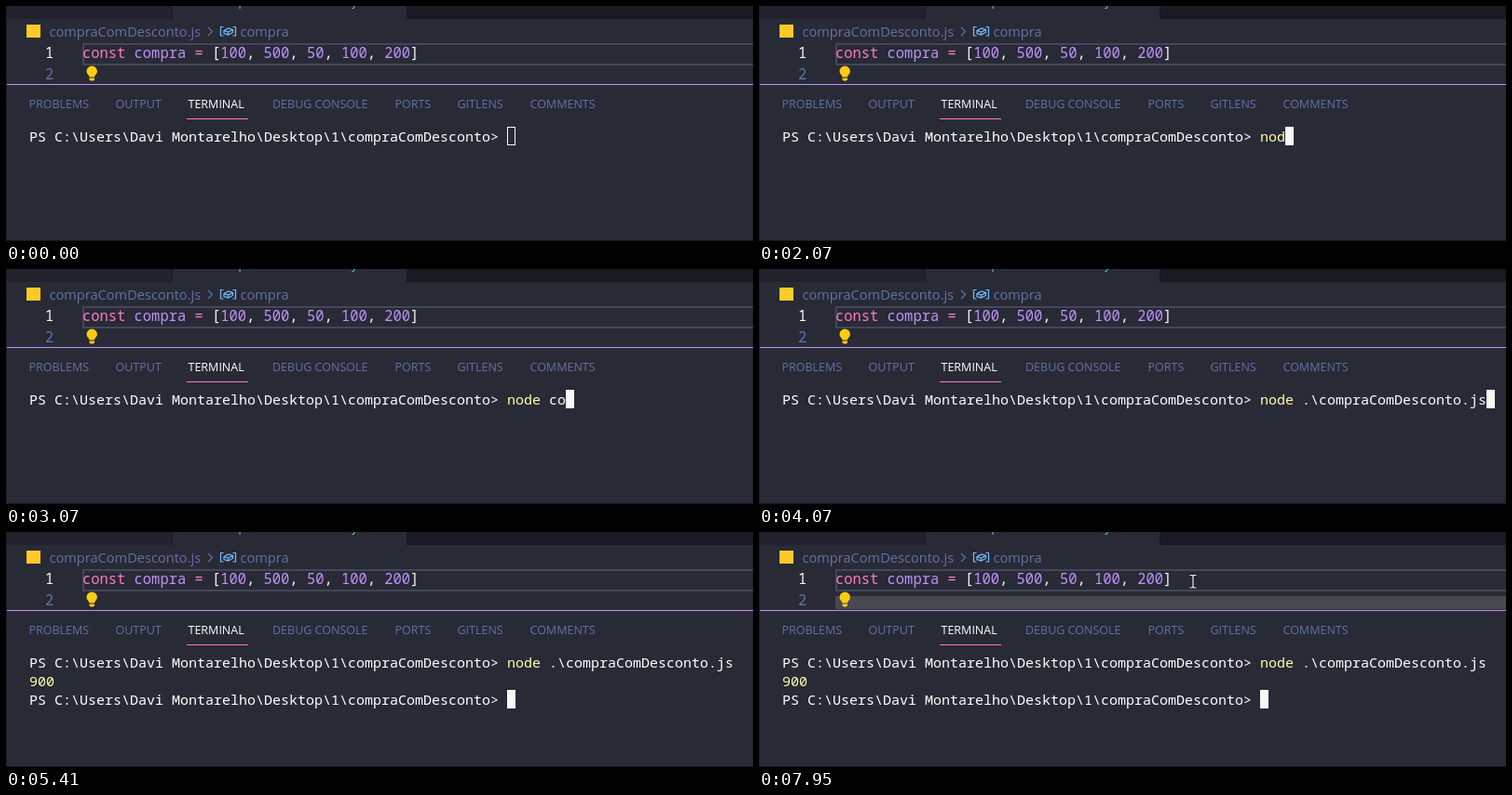
An HTML page for the animation above (8 s loop, 802 by 253 pixels).

```html
<!DOCTYPE html>
<html lang="pt">
<head>
<meta charset="utf-8">
<title>Terminal</title>
<style>
  html, body { margin: 0; width: 100%; height: 100%; overflow: hidden; background: #282a36; }
  svg { display: block; }
  text { white-space: pre; fill: #f8f8f2; }
  .ui { font-family: "Open Sans", "Noto Sans", sans-serif; font-size: 14.6px; }
  .tabs { font-family: "Open Sans", "Noto Sans", sans-serif; font-size: 12.5px; }
  .code, .term { font-family: "Noto Sans Mono", "DejaVu Sans Mono", monospace; font-weight: 500; }
  .code { font-size: 15.45px; }
  .term { font-size: 15px; }
  .term text { fill: #fff; }
  .active { fill: #fff; font-weight: 500; }
  .dim { fill: #6272a4; }
  .pink { fill: #ff79c6; }
  .purple { fill: #bd93f9; }
  .term .yellow { fill: #ffffa5; }
</style>
</head>
<body>
<svg width="802" height="253" viewBox="0 0 802 253">
  <!-- editor tabs -->
  <rect width="802" height="14" fill="#191a21"/>
  <rect width="178" height="14" fill="#21222c"/>
  <rect x="179" width="251" height="14" fill="#282a36"/>
  <text class="ui" x="220" y="-1" style="fill:#4fc59a">compraComDesconto.js</text>

  <!-- breadcrumb -->
  <rect x="22" y="20" width="15" height="14" fill="#ffca28"/>
  <text class="ui dim" x="46.5" y="32.5">compraComDesconto.js</text>
  <path d="M217 23l4.500 4.500-4.500 4.500" fill="none" stroke="#6272a4" stroke-width="1.200"/>
  <g fill="none" stroke="#75beff" stroke-width="1.200">
    <path d="M233.500 22.500h-3v9.500h3M243.500 22.500h3v9.500h-3"/>
    <path d="M234 26.500l5-2.500 4.500 1.500v3l-5 2.500-4.500-1.500zl4.500 1.500 5-2.500M238.500 28v3"/>
  </g>
  <text class="ui dim" x="251.500" y="32.500">compra</text>

  <!-- editor -->
  <path d="M802 41H83V63H802" fill="none" stroke="#44475a" stroke-width="2"/>
  <text class="code" x="42" y="56">1</text>
  <text class="code dim" x="42" y="78.500">2</text>
  <text class="code" id="source" x="82" y="56"></text>
  <rect id="scrollbar" x="82" y="69" width="720" height="14" fill="#797979" fill-opacity=".4"/>
  <path d="M89.500 76.500C89.500 74.500 86.500 73.500 86.500 70.300A5.700 5.700 0 0 1 97.900 70.300C97.900 73.500 95 74.500 95 76.500ZM89.500 77.500H95V79.500L93.500 80.500H91L89.500 79.500Z" fill="#ffcc12"/>

  <!-- panel -->
  <rect y="84" width="802" height="1" fill="#bd93f9"/>
  <g id="panelTabs"></g>
  <rect x="194" y="121" width="66" height="1" fill="#ff79c6"/>
  <g class="term">
    <text id="line1" x="25" y="146"></text>
    <text id="line2" class="yellow" x="25" y="166"></text>
    <text id="line3" x="25" y="186"></text>
  </g>
  <rect id="caret" width="8" height="19" stroke="#f8f8f2"/>
  <rect width="1" height="253" fill="#1e1f28"/>
  <rect y="252" width="802" height="1" fill="#191a21"/>

  <g id="mouse" fill="none">
    <path d="M-3.500-6.500H-1L0-5.500 1-6.500H3.500M0-5.500V6M-3.500 7H-1L0 6 1 7H3.500" stroke="#15161c" stroke-width="2.600"/>
    <path d="M-3.500-6.500H-1L0-5.500 1-6.500H3.500M0-5.500V6M-3.500 7H-1L0 6 1 7H3.500" stroke="#f4f4f4" stroke-width="1.200"/>
  </g>
</svg>
<script>
const $ = id => document.getElementById(id);
const clamp = v => Math.min(1, Math.max(0, v));
const LOOP = 8000, CHAR = 9, LEFT = 25, TOP = 130, ROW = 20, TICK = 70;
const PROMPT = String.raw`PS C:\Users\Davi Montarelho\Desktop\1\compraComDesconto> `;
const PROMPT_HTML = PROMPT.replace('>', '&gt;');

// Text present in the command line from each time on.
const typing = [
  [0, ''], [1600, 'n'], [1820, 'no'], [2010, 'nod'], [2210, 'node'], [2470, 'node '],
  [2940, 'node c'], [3070, 'node co'], [4000, String.raw`node .\compraComDesconto.js`]
];
const FOCUS = 940, ENTER = 5210, OUTPUT = 5340, DONE = 5410;
const MOVE = 7060, NUDGE = 7670, HOVER = 7200;

const span = (cls, text) => `<tspan class="${cls}">${text}</tspan>`;

$('source').innerHTML = span('pink', 'const') + span('purple', ' compra ') + span('pink', '= ') +
  '[100, 500, 50, 100, 200]'.replace(/\d+/g, n => span('purple', n));

$('panelTabs').innerHTML = [
  ['PROBLEMS', 24.5], ['OUTPUT', 117.5], ['TERMINAL', 195.5], ['DEBUG CONSOLE', 286],
  ['PORTS', 417.5], ['GITLENS', 484.5], ['COMMENTS', 562.5]
].map(([name, x]) =>
  `<text class="tabs ${name === 'TERMINAL' ? 'active' : 'dim'}" x="${x}" y="110">${name}</text>`).join('');

function setText(id, html) {
  const el = $(id);
  if (el.shown !== html) el.innerHTML = el.shown = html;
}

function drawTerminal(t) {
  const command = typing.filter(([start]) => t >= start).pop()[1];
  setText('line1', PROMPT_HTML + span('yellow', command.slice(0, 4)) + command.slice(4));
  setText('line2', t >= OUTPUT ? '900' : '');
  setText('line3', t >= DONE ? PROMPT_HTML : '');

  let row = 0, column = PROMPT.length + command.length;
  if (t >= DONE) [row, column] = [2, PROMPT.length];
  else if (t >= ENTER) [row, column] = [t >= OUTPUT ? 2 : 1, 0];
  $('caret').setAttribute('x', LEFT + column * CHAR + 0.5);
  $('caret').setAttribute('y', TOP + row * ROW + 0.5);
  $('caret').setAttribute('fill', t < FOCUS ? 'none' : '#f8f8f2');
}

function drawMouse(t) {
  const steps = start => Math.floor((t - start) / TICK);
  const sweep = clamp(steps(MOVE) / 5);
  const nudge = clamp((steps(NUDGE) + 1) / 5);
  const x = 766.5 - 258.5 * sweep - 42 * (1 - (1 - nudge) ** 2);
  const y = 53 + 91 * (1 - sweep) ** 3;
  $('mouse').setAttribute('transform', `translate(${x} ${y})`);
  $('mouse').setAttribute('visibility', t < MOVE ? 'hidden' : 'visible');
  $('scrollbar').setAttribute('opacity', clamp((t - HOVER) / 100));
}

function draw() {
  const t = performance.now() % LOOP;
  drawTerminal(t);
  drawMouse(t);
  requestAnimationFrame(draw);
}
draw();
</script>
</body>
</html>
```
